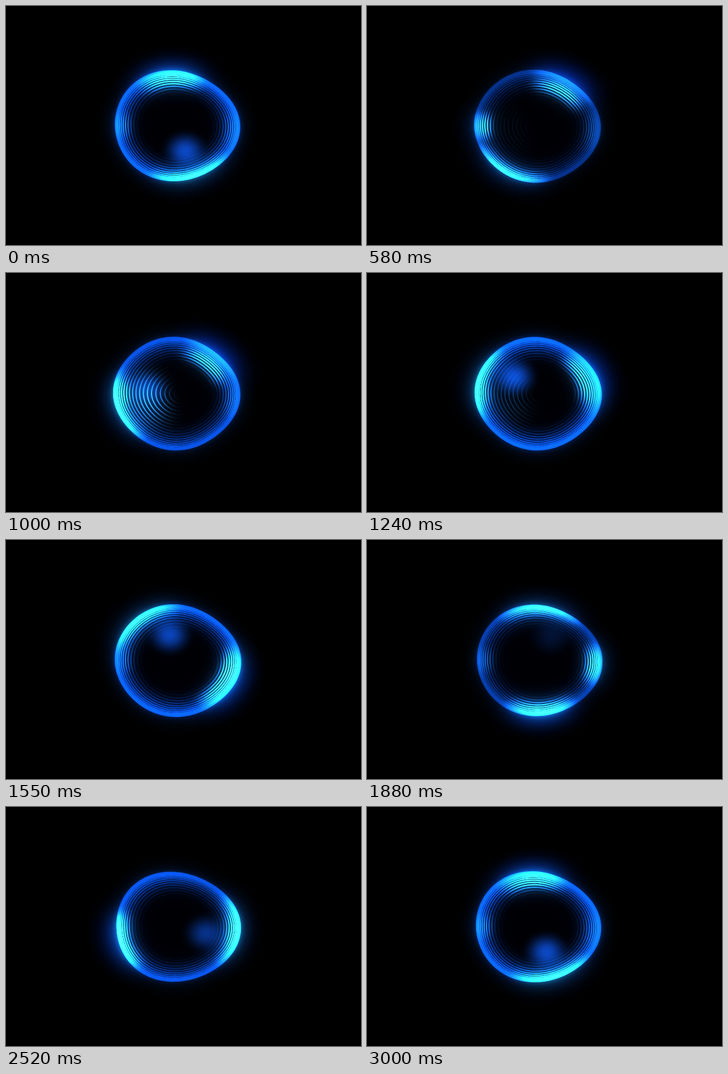
Write an HTML page with a canvas that moves like this. It is 600x405 px and loops after 3.03 s.

```html
<!DOCTYPE html>
<html>
<head>
<meta charset="utf-8">
<style>
html, body { margin: 0; width: 100%; height: 100%; overflow: hidden; background: #000; }
canvas { display: block; }
</style>
</head>
<body>
<canvas id="stage" width="600" height="405"></canvas>
<script>
const W = 600, H = 405, LAP = 3000, LOOP = 3030, STEP = 30, TURN = 2 * Math.PI;
const { sin, cos, floor } = Math;
const ctx = stage.getContext('2d');
const layer = document.createElement('canvas');
layer.width = W;
layer.height = H;
const lit = layer.getContext('2d');

// Swings between 0 and 1, reaching 1 at the peak time.
const wave = (t, peak, period = LAP) => (1 + cos(TURN * (t - peak) / period)) / 2;

function bodyAt(t) {
  const swell = wave(t, 1000);
  return {
    cx: 286.8 + 3 * wave(t, 2000),
    cy: 203 + 1.6 * wave(t, 1300),
    a: 104.3 + .8 * swell,
    b: 92 + 2 * swell,
    three: .028 - .018 * swell,
    four: .015 * swell
  };
}

function lightsAt(t) {
  const u = t / LAP;
  return [
    { // main light, slow over the top right, then quickly round the bottom
      angle: TURN * (u ** 1.6 - .264) + .26 * sin(2 * TURN * u),
      rho: .92 - .18 * wave(t, 800), spread: .55, size: .24, power: 1, glow: 1
    },
    { // counter light on the rim
      angle: TURN * (u ** 1.25 + .208),
      rho: .94, spread: .65, size: .24, power: .7, glow: .55
    },
    { angle: .08, rho: .87, spread: .35, size: .22, power: .15 + .85 * wave(t, 1880) ** 3, glow: .3 },
    { angle: TURN / 2, rho: .83, spread: .25, size: .2, power: .25 + .8 * wave(t, 580) ** 6, glow: .3 },
    { angle: 2.9, rho: .5, spread: .7, size: .6, power: .6 * wave(t, 950) ** 16, glow: 0 }
  ];
}

function ring(path, body, s) {
  for (let i = 0; i <= 120; i++) {
    const q = i / 120 * TURN;
    const r = s * (1 + body.three * cos(3 * q) + body.four * cos(4 * q) + .012 * sin(2 * q));
    const x = body.cx + 8 * (1 - s) + body.a * r * cos(q);
    const y = body.cy + body.b * r * sin(q);
    i ? path.lineTo(x, y) : path.moveTo(x, y);
  }
  path.closePath();
}

// Soft round light; fade maps the distance 0..1 to a strength.
function spot(c, body, angle, rho, size, rgb, power, fade) {
  c.save();
  c.translate(body.cx, body.cy);
  c.scale(body.a, body.b);
  c.translate(rho * cos(angle), rho * sin(angle));
  c.scale(size, size);
  const g = c.createRadialGradient(0, 0, 0, 0, 0, 1);
  for (let d = 0; d <= 1; d += .0625) g.addColorStop(d, `rgba(${rgb},${Math.min(1, power * fade(d))})`);
  c.fillStyle = g;
  c.fillRect(-1, -1, 2, 2);
  c.restore();
}
const bell = d => (1 - d * d) ** 3;
const halo = d => (1 - d) ** 2.2;

// A row of spots along the curve of the body.
function arc(c, body, { angle, spread }, rho, size, rgb, power, fade) {
  const n = 6, weight = 1.3 * spread / n / size;
  for (let k = -n; k <= n; k++) {
    const edge = 1 - (k / (n + 1)) ** 2;
    spot(c, body, angle + k * spread / n, rho, size, rgb, power * weight * edge, fade);
  }
}

function drawLit(body, lights, base, rings) {
  lit.globalCompositeOperation = 'source-over';
  lit.fillStyle = '#000';
  lit.fillRect(0, 0, W, H);
  lit.globalCompositeOperation = 'lighter';
  spot(lit, body, 0, 0, 1.1, '10,92,250', base, d => Math.min(.9, Math.max(0, (d - .5) * 2.6) ** 1.5));
  for (const l of lights) {
    arc(lit, body, l, l.rho, l.size, '38,150,255', l.power, bell);
    if (l.glow) arc(lit, body, l, .98, .16, '25,125,220', l.power * .5, bell);
  }
  lit.globalCompositeOperation = 'destination-in';
  lit.lineWidth = 1.9;
  lit.stroke(rings);
}

function draw(t) {
  const body = bodyAt(t), lights = lightsAt(t), pulse = wave(t, 1340, LAP / 2);
  const outline = new Path2D(), rings = new Path2D();
  ring(outline, body, 1);
  for (let q = 0; q < 1.5; q += .07) ring(rings, body, cos(q));
  drawLit(body, lights, .42 + .55 * pulse, rings);

  ctx.globalCompositeOperation = 'source-over';
  ctx.fillStyle = '#000';
  ctx.fillRect(0, 0, W, H);
  ctx.globalCompositeOperation = 'lighter';
  for (const l of lights) {
    arc(ctx, body, l, .93, .65, '0,50,235', l.power * l.glow * .75, halo);
  }
  ctx.globalCompositeOperation = 'source-over';
  ctx.fillStyle = 'rgba(0,0,6,.8)';
  ctx.fill(outline);

  ctx.globalCompositeOperation = 'lighter';
  ctx.save();
  ctx.clip(outline);
  spot(ctx, body, TURN * (t / LAP + .2), .48, .46, '14,88,235', .9 * pulse, bell);
  ctx.restore();

  for (const [blur, alpha] of [[14, .5], [4, .4], [0, 1]]) {
    ctx.filter = blur ? `blur(${blur}px)` : 'none';
    ctx.globalAlpha = alpha;
    ctx.drawImage(layer, 0, 0);
  }
  ctx.globalAlpha = 1;
}

const start = performance.now();
function tick() {
  const t = (performance.now() - start) % LOOP;
  draw(floor(t / STEP) * STEP % LAP);
  requestAnimationFrame(tick);
}
tick();
</script>
</body>
</html>
```
